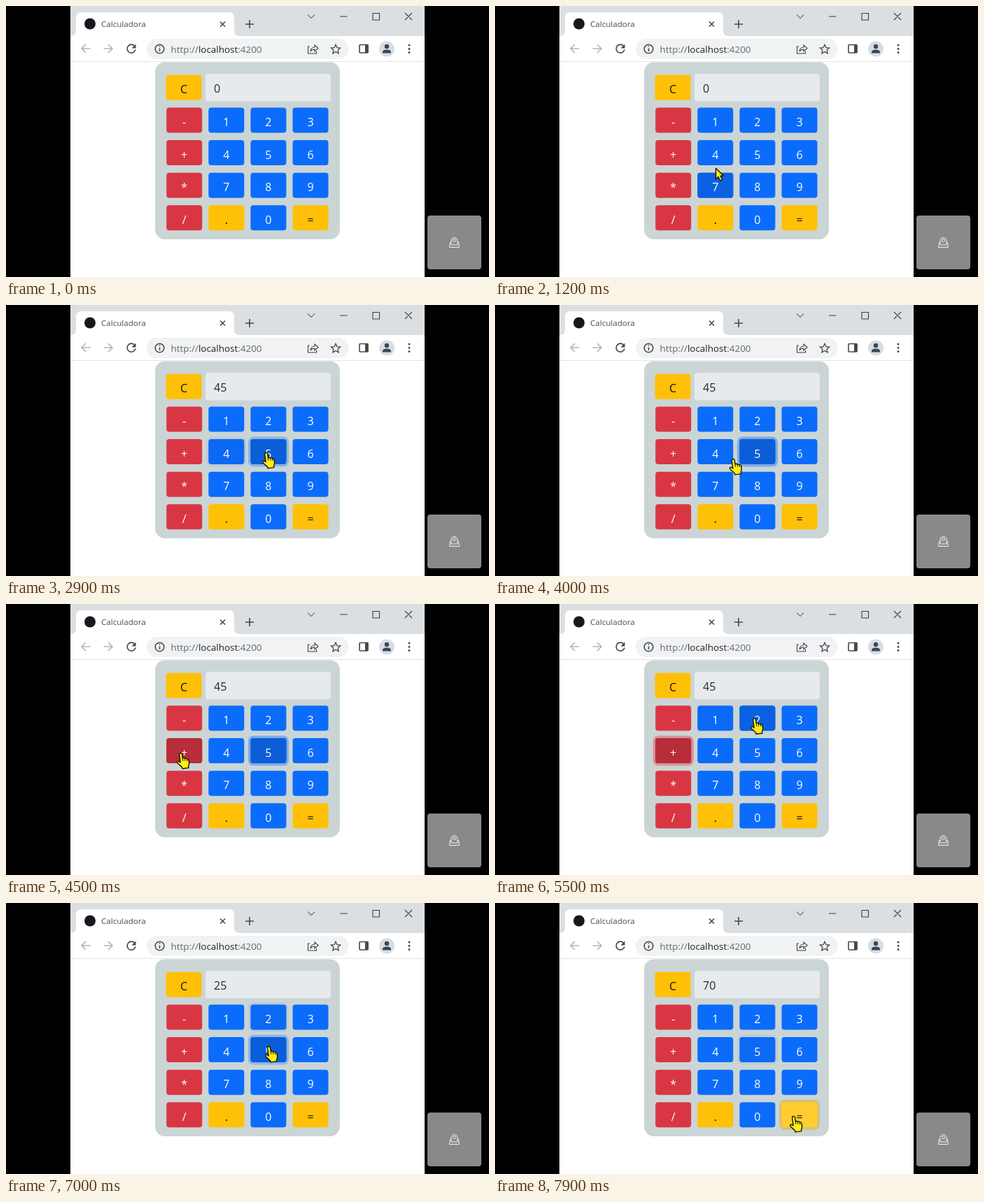
Recreate the animation shown at these times as an HTML page. Size 690x388 px, loop 8000 ms.

```html
<!DOCTYPE html>
<html lang="es">
<head>
<meta charset="utf-8">
<title>Calculadora</title>
<style>
html, body { margin: 0; width: 100%; height: 100%; overflow: hidden; background: #000; }
svg { display: block; width: 100vw; height: 100vh; font-family: "Open Sans", "Noto Sans", sans-serif; }
.line { fill: none; stroke: #45484c; stroke-width: 1.6; }
.thin { fill: none; stroke: #3c3f43; stroke-width: 1.1; }
</style>
</head>
<body>
<svg viewBox="0 0 690 388">
  <rect width="690" height="388"/>
  <rect x="92" width="506" height="388" fill="#fff"/>
  <rect x="92" width="506" height="43" fill="#dcdfe2"/>
  <path d="M92 43Q100 43 100 35V17Q100 9 108 9H318Q326 9 326 17V35Q326 43 334 43Z" fill="#fff"/>
  <circle cx="120" cy="25.5" r="8" fill="#15181d"/>
  <text x="136" y="30" font-size="11.6" fill="#4b4e52">Calculadora</text>
  <path class="line" d="M306 22.5l7 7m0-7l-7 7M342 26h12m-6-6v12"/>
  <path class="thin" d="M477 15h10.5M524 10.5h9.500v9.500h-9.500zM570 10l10 10m0-10l-10 10"/>
  <path class="thin" style="stroke:#707376" d="M431 12.5l5 5 5-5"/>

  <path d="M92 79.5H598" stroke="#e2e4e6"/>
  <path class="line" style="stroke:#b3b5b8" d="M120.5 61H108m6-6l-6 6 6 6M139.5 61H152m-6-6l6 6-6 6"/>
  <path class="line" d="M183.5 57A6 6 0 1 0 185 62.5"/>
  <path d="M185.5 54.5v6h-6z" fill="#45484c"/>
  <rect x="201" y="47" width="288.5" height="29" rx="14.5" fill="#f0f2f3"/>
  <circle class="line" cx="219.5" cy="61.5" r="6.300"/>
  <path class="line" d="M219.5 60.5v4.500m0-8v1.600"/>
  <text x="235.5" y="66.5" font-size="13.45" fill="#65696e">http://<tspan fill="#222529">localhost</tspan>:4200</text>
  <path class="thin" d="M434 58h-2.500v10h12v-3M435 65q.5-6 6-6v-3l5 4.500-5 4.500v-3q-4 0-6 3z"/>
  <path class="line" style="stroke-width:1.300" d="M471 55.300l1.900 4.300 4.700.5-3.500 3.200 1 4.600-4.100-2.400-4.100 2.400 1-4.600-3.500-3.200 4.700-.5z"/>
  <rect class="line" x="505" y="55.5" width="12" height="11.5" rx="1"/>
  <rect x="513" y="55.5" width="4.5" height="11.5" fill="#45484c"/>
  <circle cx="544" cy="61.5" r="11" fill="#d6dde6"/>
  <circle cx="544" cy="58" r="3.2" fill="#3c4654"/>
  <path d="M538 67.5v-1.500q0-3.500 6-3.500t6 3.500v1.500z" fill="#3c4654"/>
  <path d="M576 56v11" stroke="#45484c" stroke-width="3" stroke-linecap="round" stroke-dasharray="0 5.3"/>

  <rect x="213" y="80.5" width="264" height="253.5" rx="14" fill="#ccd5d5"/>
  <rect x="285" y="97" width="179" height="39.5" rx="4" fill="#e7eaed"/>
  <text id="display" x="297" y="123.5" font-size="16" fill="#25292d"></text>
  <g id="keys"></g>

  <rect x="602" y="300" width="77" height="77" rx="4" fill="#8a8989"/>
  <g fill="none" stroke="#f2f2f2">
    <path d="M636 342V336a4.500 4.500 0 0 1 9 0V342M636 338.5h-1.500L633.5 345.5H647.5L646.5 338.5H645M636 342h9"/>
    <circle cx="640.5" cy="335.500" r="2"/>
  </g>

  <g id="cursor" fill="#ffee12" stroke="#17170a" stroke-width="1.4" stroke-linejoin="round">
    <path id="arrow" d="M.5.5V16L4 12.700 6.700 18.500 9.700 17.200 7 11.500H11.500Z"/>
    <g id="hand" transform="translate(-.7 -.5) rotate(-8)">
      <path d="M-2 2Q-2 0 0 0T2 2V7.500Q4.500 6.700 5 8.500 7.300 7.800 7.800 9.700 10.200 9.300 10.200 11.500V15.500Q10.200 18 8.500 20V22.500H-.5V20.500L-5.800 14Q-7 12-5.600 11.300-4 10.700-2 13.200Z"/>
      <path d="M2 7.500v4m3-3v3.500m2.800-2.300v3" fill="none" stroke-width="1"/>
    </g>
  </g>
</svg>
<script>
const LOOP = 8000, STEP = 100, FADE = 130;
const KEY_W = 51, KEY_H = 36;
const $ = id => document.getElementById(id);

const STYLES = {
  blue: { base: "#0b6cfb", hover: "#0b5ed7", ring: "#3184fd", ink: "#fff" },
  red: { base: "#d93644", hover: "#b82d3a", ring: "#e15361", ink: "#fff" },
  gold: { base: "#fec107", hover: "#ffcd32", ring: "#d9a406", ink: "#111" }
};

// pointer moves: where each one ends, when it runs, how far it bows downwards
const MOVES = [
  { x: 299, y: 395, from: 0, to: 1, bow: 0 },
  { x: 300, y: 300, from: 650, to: 900, bow: 0 },
  { x: 320, y: 209, from: 1000, to: 1400, bow: 0 },
  { x: 372, y: 212, from: 2100, to: 2400, bow: 0 },
  { x: 250, y: 214, from: 3920, to: 4500, bow: 18 },
  { x: 392, y: 168, from: 5180, to: 5700, bow: -11 },
  { x: 376, y: 206, from: 6250, to: 6650, bow: 0 },
  { x: 427, y: 306, from: 7150, to: 7550, bow: 0 }
];

// time, key pressed, display afterwards
const CLICKS = [
  [0, "", "0"], [1900, "4", "4"], [2800, "5", "45"], [4900, "+", "45"],
  [6000, "2", "2"], [6900, "5", "25"], [7800, "=", "70"]
];

function make(tag, attrs) {
  const el = document.createElementNS("http://www.w3.org/2000/svg", tag);
  for (const k in attrs) el.setAttribute(k, attrs[k]);
  return $("keys").appendChild(el);
}

function makeKey(label, x, y) {
  const style = STYLES["C.=".includes(label) ? "gold" : "-+*/".includes(label) ? "red" : "blue"];
  const box = { x, y, width: KEY_W, height: KEY_H, rx: 4 };
  const ring = make("rect", { ...box, fill: "none", stroke: style.ring, "stroke-width": 7 });
  make("rect", { ...box, fill: style.base });
  const glow = make("rect", { ...box, fill: style.hover });
  const text = make("text", { x: x + KEY_W / 2, y: y + 26.5, "font-size": 16, "text-anchor": "middle", fill: style.ink });
  text.textContent = label;
  return { label, x, y, ring, glow };
}

const keys = [makeKey("C", 228.5, 98.8)];
["-123", "+456", "*789", "/.0="].forEach((row, r) =>
  [...row].forEach((c, i) => keys.push(makeKey(c, 229.2 + i * 60.1, 145.5 + r * 46.6))));

function pointer(t) {
  const i = Math.max(1, MOVES.findLastIndex(m => m.from <= t));
  const a = MOVES[i - 1], b = MOVES[i];
  const f = Math.min(1, Math.max(0, (t - b.from) / (b.to - b.from)));
  const ease = 1 - (1 - f) ** 2;
  return [a.x + (b.x - a.x) * ease, a.y + (b.y - a.y) * ease + b.bow * 4 * f * (1 - f)];
}

const lastClick = t => CLICKS.findLast(c => c[0] <= Math.max(t, 0));
const over = (key, [x, y]) => x >= key.x && x < key.x + KEY_W + 2 && y >= key.y && y < key.y + KEY_H;

// share of the recent past during which a state held, for soft transitions
function fade(test, t) {
  let n = 0;
  for (let i = 0; i < 10; i++) n += test(t - i * FADE / 10);
  return n / 10;
}

function draw(t) {
  const p = pointer(t);
  for (const key of keys) {
    const focused = u => lastClick(u)[1] === key.label;
    key.glow.setAttribute("opacity", fade(u => focused(u) || over(key, pointer(u)), t));
    key.ring.setAttribute("opacity", fade(focused, t) / 2);
  }
  $("display").textContent = lastClick(t)[2];
  const onKey = keys.some(k => over(k, p));
  $("hand").style.display = onKey ? "" : "none";
  $("arrow").style.display = onKey ? "none" : "";
  $("cursor").setAttribute("transform", `translate(${p})`);
}

const start = performance.now();
function tick() {
  const t = (performance.now() - start) % LOOP;
  draw(Math.floor(t / STEP) * STEP);
  requestAnimationFrame(tick);
}
tick();
</script>
</body>
</html>
```
